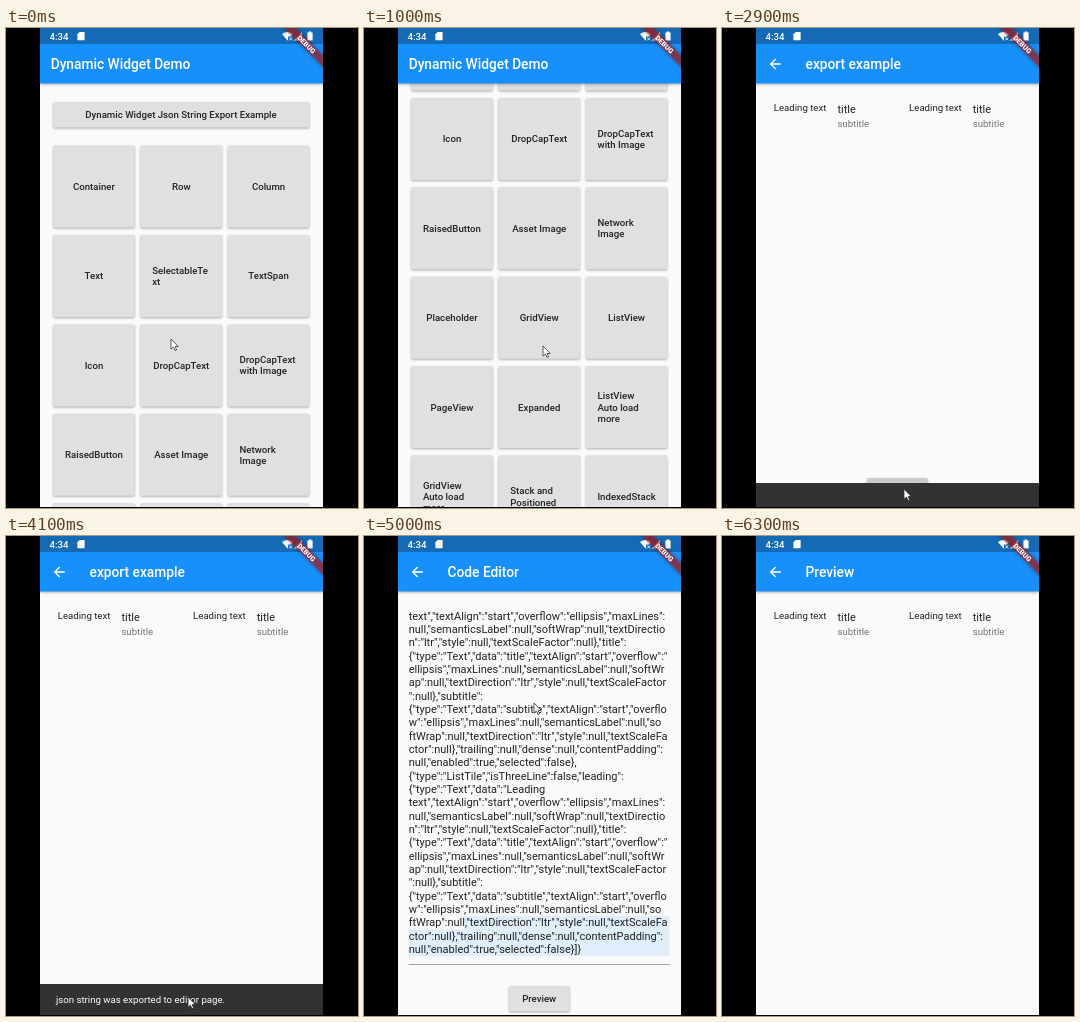
Animation, 352 px wide and 480 px high, one loop 6500 ms. Source, as an HTML page:

```html
<!DOCTYPE html>
<html lang="en">
<head>
<meta charset="utf-8">
<title>Dynamic Widget Demo</title>
<style>
html, body { margin: 0; width: 100%; height: 100%; overflow: hidden; background: #000; }
svg { display: block; width: 352px; height: 480px; }
text { font: 9.63px Roboto, sans-serif; fill: #222; white-space: pre; }
.label { font-weight: 500; }
.head { font-size: 13.76px; font-weight: 500; fill: #fff; }
.big { font-size: 11px; }
.sub { fill: #757575; }
.white { fill: #fff; }
.mid { text-anchor: middle; }
.btn { fill: #e0e0e0; filter: drop-shadow(0 1px 1px rgba(0,0,0,.32)); }
.bar { filter: drop-shadow(0 1.5px 1.5px rgba(0,0,0,.3)); }
</style>
</head>
<body>
<svg viewBox="0 0 352 480">
  <defs>
    <clipPath id="phone"><path d="M34 0H317V479H34Z"/></clipPath>
    <clipPath id="field"><path d="M40 73H310V421H40Z"/></clipPath>
  </defs>
  <g clip-path="url(#phone)">
    <g id="pages"></g>
    <g id="status" fill="#fff">
      <text class="label white" x="43.5" y="11.6">4:34</text>
      <path d="M73.6 4H78.6V12.2H71.4V6.3Z"/>
      <path d="M276 6Q281.5 1.8 287 6L285 8.4H282V12L281.5 12.6Z"/>
      <path d="M283.2 9.4l3 3m0-3l-3 3" stroke="#fff" stroke-width=".9"/>
      <path d="M296 4V12.4H287.8Z"/>
      <path d="M301.4 4.6H302.8V3.6H305.2V4.6H306.6V12.6H301.4Z"/>
    </g>
    <g transform="translate(317 0) rotate(45)">
      <path d="M-40 19.3H40V27.5H-40Z" fill="#b71c1c" fill-opacity=".63"
        style="filter:drop-shadow(0 0 2px rgba(0,0,0,.5))"/>
      <text class="mid white" y="25.9" style="font-size:7px;font-weight:900">DEBUG</text>
    </g>
  </g>
  <path id="cursor" d="M0 0V10.2L2.4 8.1 4 11.6 5.6 10.9 4.1 7.5H7.2Z" fill="#fff" stroke="#333" stroke-width=".8"/>
</svg>
<script>
const LOOP = 6500, STEP = 100, LINE = 13.33;
const $ = id => document.getElementById(id);

const text = (s, x, y, cls = '') => `<text class="${cls}" x="${x}" y="${y}">${s}</text>`;
const rect = (x, y, w, h, attrs) => `<rect x="${x}" y="${y}" width="${w}" height="${h}" ${attrs}/>`;
const button = (x, y, w, h, id = '') => rect(x, y, w, h, `rx="1.4" class="btn" id="${id}"`);

function page(id, title, body, back = true) {
  const arrow = '<path transform="translate(45 27.8) scale(.688)" fill="#fff" ' +
    'd="M20 11H7.83l5.59-5.59L12 4l-8 8 8 8 1.41-1.41L7.83 13H20Z"/>';
  return `<g id="${id}">` + rect(34, 0, 283, 480, 'fill="#fafafa"') + body +
    rect(34, 0, 283, 55.5, 'fill="#1890fb" class="bar"') + rect(34, 0, 283, 16, 'fill="#146ab5"') +
    (back ? arrow : '') + text(title, back ? 83.5 : 44.7, 41.3, 'head') + '</g>';
}

// Home grid: "/" marks a line break inside a label
const tiles = ('Container,Row,Column,Text,SelectableTe/xt,TextSpan,Icon,DropCapText,DropCapText/with Image,' +
  'RaisedButton,Asset Image,Network/Image,Placeholder,GridView,ListView,PageView,Expanded,' +
  'ListView/Auto load/more,GridView/Auto load/more,Stack and/Positioned,IndexedStack').split(',');

function tile(label, i) {
  const x = 47.3 + 87.3 * (i % 3), y = 117.6 + 89.4 * Math.floor(i / 3);
  const lines = label.split('/'), n = lines.length;
  return button(x, y, 81.3, 82) + lines.map((s, k) => {
    const base = y + 44.4 + (k - (n - 1) / 2) * 11.2;
    return n > 1 ? text(s, x + 11.6, base, 'label') : text(s, x + 40.65, base, 'label mid');
  }).join('');
}

const home = '<g id="list">' + button(47.3, 74, 256, 25.6) +
  text('Dynamic Widget Json String Export Example', 175, 90.2, 'label mid') +
  tiles.map(tile).join('') + '</g>';

const listTiles = [0, 135.3].map(dx =>
  text('Leading text', 51.8 + dx, 82.8) + text('title', 115.4 + dx, 85, 'big') +
  text('subtitle', 115.4 + dx, 99.3, 'sub')).join('');

const actionButton = (label, id) => button(145, 450, 60.6, 25.2, id) + text(label, 175.2, 466, 'label mid');

const snack = '<g id="snack">' + rect(34, 448, 283, 34, 'fill="#323232"') +
  '<text id="note" class="white" x="50" y="467.2">json string was exported to editor page.</text></g>';

// Each list tile is the same 14 wrapped lines of JSON
const tileJson = `{"type":"ListTile","isThreeLine":false,"leading":
{"type":"Text","data":"Leading
text","textAlign":"start","overflow":"ellipsis","maxLines":
null,"semanticsLabel":null,"softWrap":null,"textDirectio
n":"ltr","style":null,"textScaleFactor":null},"title":
{"type":"Text","data":"title","textAlign":"start","overflow":"
ellipsis","maxLines":null,"semanticsLabel":null,"softWr
ap":null,"textDirection":"ltr","style":null,"textScaleFactor
":null},"subtitle":
{"type":"Text","data":"subtitle","textAlign":"start","overflo
w":"ellipsis","maxLines":null,"semanticsLabel":null,"so
ftWrap":null,"textDirection":"ltr","style":null,"textScaleFa
ctor":null},"trailing":null,"dense":null,"contentPadding":
null,"enabled":true,"selected":false}`;
const json = `{"type":"GridView","crossAxisCount":2,
"mainAxisSpacing":0.0,"crossAxisSpacing":0.0,
"childAspectRatio":1.0,"children":[
${tileJson},
${tileJson}]}`.split('\n');
const hidden = json.length - 26;

const editor = '<path id="select" fill="#dfeefa" d="M100 380H305.5V420H44.5V393.5H100Z"/>' +
  '<g clip-path="url(#field)"><g id="code">' +
  json.map((s, i) => text(s, 44.7, 83.8 + (i - hidden) * LINE, 'big')).join('') + '</g></g>' +
  rect(44.5, 428, 261.5, .8, 'fill="#8c8c8c"') + actionButton('Preview', 'previewBtn');

$('pages').innerHTML = page('home', 'Dynamic Widget Demo', home, false) +
  page('export', 'export example', listTiles + actionButton('Export', 'exportBtn') + snack) +
  page('editor', 'Code Editor', editor) + page('preview', 'Preview', listTiles);

const clamp = v => Math.min(1, Math.max(0, v));
const ramp = (t, a, b) => clamp((t - a) / (b - a));

// Eased interpolation through [time, ...values]
function track(t, keys) {
  const i = keys.findIndex(k => k[0] > t);
  if (i < 0) return keys[keys.length - 1].slice(1);
  if (!i) return keys[0].slice(1);
  const a = keys[i - 1], b = keys[i], p = ramp(t, a[0], b[0]), e = p * p * (3 - 2 * p);
  return a.slice(1).map((v, k) => v + (b[k + 1] - v) * e);
}

const scrollKeys = [[0, 0], [650, 262], [800, 262], [1000, 226.5], [1350, 0]];
const codeKeys = [[4650, hidden * LINE], [4950, 0]];
const cursorKeys = [[0, 165, 311], [650, 172, 300], [1000, 179, 318], [1400, 134, 87], [2100, 133.5, 87],
  [2700, 182, 461], [4400, 182, 461], [5000, 170, 167], [5100, 170, 167], [5600, 175, 460]];

const move = (id, x, y) => $(id).setAttribute('transform', `translate(${x} ${y})`);
const press = (id, on) => $(id).style.fill = on ? '#cbcbcb' : '';

function enter(id, t, start) {
  const p = ramp(t, start - 50, start + 250);
  $(id).style.display = p ? '' : 'none';
  $(id).style.opacity = p * p;
  move(id, 0, 120 * (1 - p) ** 3);
}

function draw(now) {
  const t = Math.floor(now % LOOP / STEP) * STEP;
  move('list', 0, -track(t, scrollKeys)[0]);
  move('code', 0, track(t, codeKeys)[0]);
  enter('export', t, 1500);
  enter('editor', t, 4400);
  enter('preview', t, 5800);
  move('snack', 0, t < 2900 ? 34 : 7 * (1 - ramp(t, 2900, 3100)) ** 2);
  $('note').style.opacity = ramp(t, 2900, 3100);
  $('select').style.display = t >= 4900 && t < 5300 ? '' : 'none';
  press('exportBtn', t >= 2700);
  press('previewBtn', t >= 5700);
  move('cursor', ...track(t, cursorKeys));
  $('cursor').style.display = t < 6200 ? '' : 'none';
}

function loop(now) {
  draw(now);
  requestAnimationFrame(loop);
}
draw(0);
requestAnimationFrame(loop);
</script>
</body>
</html>
```
